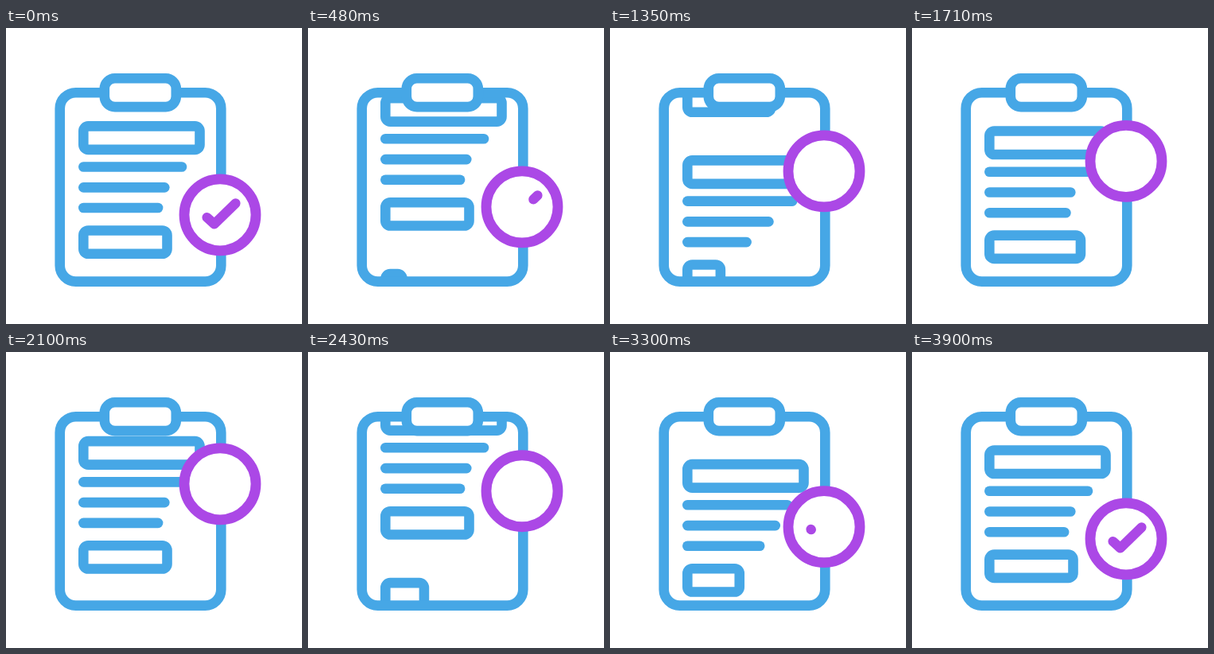
Write an HTML page with a canvas that moves like this. It is 372 px wide and 372 px high and loops after 3930 ms.

```html
<!DOCTYPE html>
<html lang="en">
<head>
<meta charset="utf-8">
<title>Checklist</title>
<style>
  html, body { margin: 0; width: 100%; height: 100%; overflow: hidden; background: #fff; }
  canvas { display: block; width: 372px; height: 372px; }
</style>
</head>
<body>
<canvas id="stage"></canvas>
<script>
const SIZE = 372, LOOP = 3930, STEP = 30;
const BLUE = '#46a7e6', PURPLE = '#ab48e6';
const PERIOD = 221;        // distance between two copies of the page content
const LEFT = 97.3;
const GROW = 620, SETTLE = 220, OVER = 0.09;
const SECOND = 1867;       // delay of the second round of growth

// y: top edge or line height, w: final width, h: box height, at: start of growth
const items = [
  { y: 123.5, w: 146.2, h: 29.5, at: 332 },
  { y: 174.7, w: 123.7, at: 654 },
  { y: 200.5, w: 102, at: 844 },
  { y: 226.2, w: 93.8, at: 947 },
  { y: 254.6, w: 105.2, h: 29.3, at: 1095 }
];

const canvas = document.getElementById('stage');
const ctx = canvas.getContext('2d');
const scale = window.devicePixelRatio || 1;
canvas.width = canvas.height = Math.round(SIZE * scale);

const clamp = v => Math.max(0, Math.min(1, v));
const ease = (t, start, span) => (1 - Math.cos(Math.PI * clamp((t - start) / span))) / 2;

// Grows past full width, then relaxes back to it.
function growth(u) {
  if (u < GROW) return (1 + OVER) * ease(u, 0, GROW);
  return 1 + OVER * (1 - ease(u, GROW, SETTLE));
}

function box(x, y, w, h, r, fill) {
  ctx.beginPath();
  ctx.roundRect(x, y, w, h, r);
  if (fill) {
    ctx.fillStyle = fill;
    ctx.fill();
  }
  ctx.stroke();
}

function drawItem(item, dy, k) {
  if (k <= 0) return;
  const w = item.w * k, y = item.y + dy;
  if (item.h) {
    box(LEFT, y, w, item.h, Math.min(6, w / 2));
  } else {
    ctx.beginPath();
    ctx.moveTo(LEFT, y);
    ctx.lineTo(LEFT + w, y);
    ctx.stroke();
  }
}

function drawContent(t) {
  const scroll = PERIOD * (ease(t, -30, 1945) + ease(t, 1840, 1785));
  ctx.save();
  ctx.beginPath();
  ctx.rect(68, 81, 240, 237);
  ctx.clip();
  for (let round = 0; round < 3; round++) {
    for (const item of items) {
      const start = item.at + (round - 1) * SECOND;
      drawItem(item, round * PERIOD - scroll, round ? growth(t - start) : 1);
    }
  }
  ctx.restore();
}

// Strokes the part of the tick between two fractions of its length.
function drawTick(cx, cy, from, to) {
  if (to - from < 0.005) return;
  const pts = [[-16.5, 3.2], [-7.2, 11.6], [19.5, -14.5]];
  const bend = 0.25;
  const at = f => {
    const i = f < bend ? 0 : 1;
    const k = i ? (f - bend) / (1 - bend) : f / bend;
    return pts[i].map((v, n) => v + (pts[i + 1][n] - v) * k);
  };
  const stops = [from, ...(from < bend && to > bend ? [bend] : []), to];
  ctx.beginPath();
  for (const f of stops) {
    const [x, y] = at(f);
    ctx.lineTo(cx + x, cy + y);
  }
  ctx.stroke();
}

function drawBadge(t) {
  const cx = 269, cy = 234.8 - 70 * ease(t, 0, 1950) * (1 - ease(t, 1950, 1950));
  ctx.strokeStyle = PURPLE;
  ctx.fillStyle = '#fff';
  ctx.lineWidth = 12.8;
  ctx.beginPath();
  ctx.arc(cx, cy, 45, 0, Math.PI * 2);
  ctx.fill();
  ctx.stroke();
  ctx.lineWidth = 12.2;
  if (t < 1950) drawTick(cx, cy, ease(t, 0, 640), 1);
  else drawTick(cx, cy, 0, ease(t, 3260, 620));
}

function draw(t) {
  ctx.setTransform(scale, 0, 0, scale, 0, 0);
  ctx.fillStyle = '#fff';
  ctx.fillRect(0, 0, SIZE, SIZE);
  ctx.lineCap = ctx.lineJoin = 'round';
  ctx.strokeStyle = BLUE;
  ctx.lineWidth = 12.6;
  drawContent(t);
  box(67.7, 81.2, 202.6, 237.4, 20);
  box(123.8, 63.3, 90, 35.8, 13, '#fff');
  drawBadge(t);
}

const begin = performance.now();
function frame() {
  const t = (performance.now() - begin) % LOOP;
  draw(Math.floor(t / STEP) * STEP);
  requestAnimationFrame(frame);
}
frame();
</script>
</body>
</html>
```
